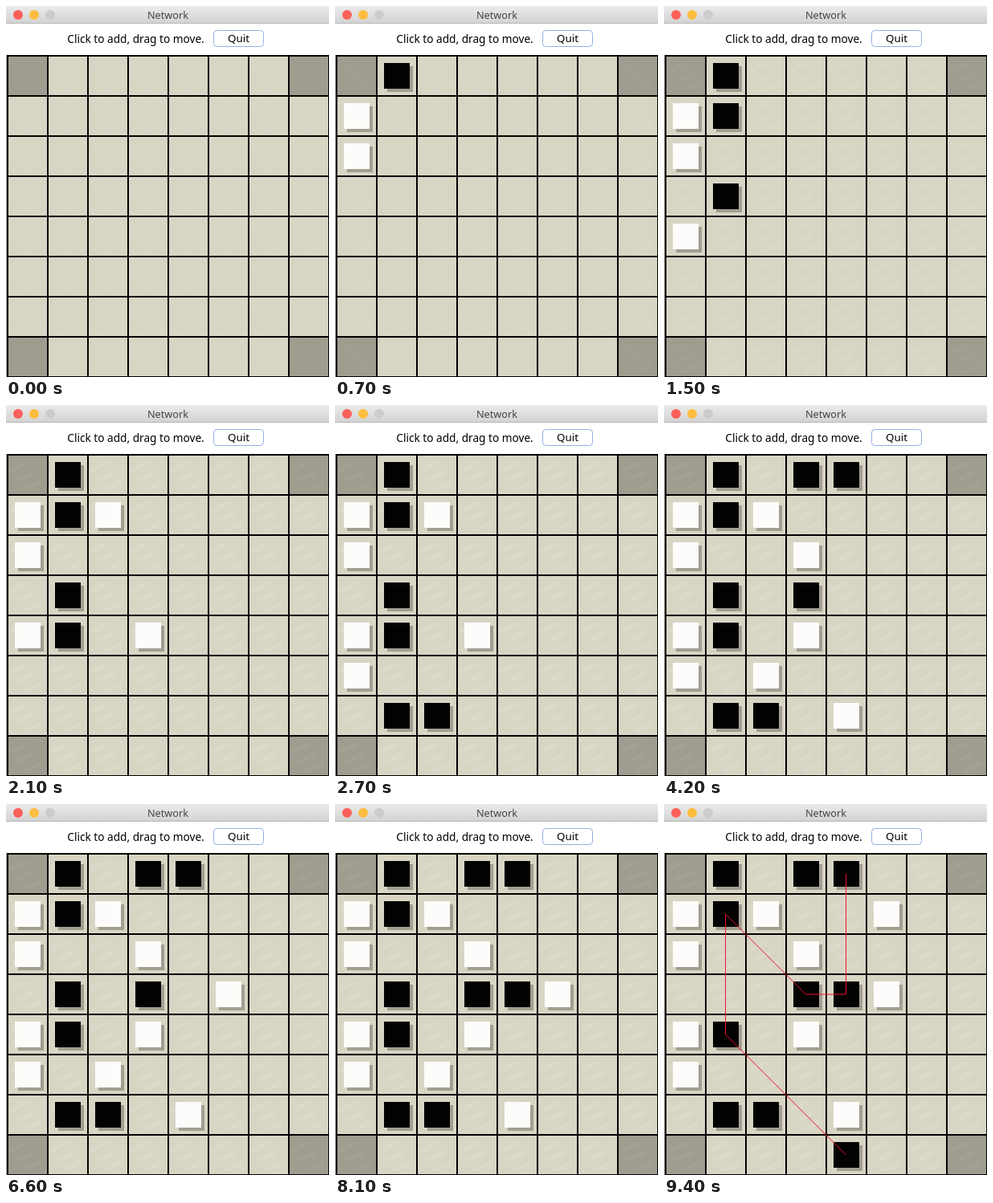
Recreate the animation shown at these times as an HTML page with a canvas. Size 402 px wide and 462 px high, loop 9500 ms.

```html
<!DOCTYPE html>
<html lang="en">
<head>
<meta charset="utf-8">
<title>Network</title>
<style>
html, body { margin: 0; width: 100%; height: 100%; overflow: hidden; background: #fff; }
canvas { display: block; }
</style>
</head>
<body>
<canvas id="stage" width="402" height="462"></canvas>
<script>
const g = document.getElementById('stage').getContext('2d');
const LOOP = 9500, STEP = 100, CELL = 50, LEFT = 2, TOP = 62, PIECE = 32;

// Cells are "column row"; white and black take turns, "a>b" moves a piece.
const moves = '01 10 02 11 04 13 21 14 34 16 05 26 32 30 25 40 46 33 53 43 25>51 13>47'.split(' ');
const winPath = '40 43 33 11 14 47'.split(' ');
const lateTimes = [4400, 7000, 8600, 9100];
const opening = moves.length - lateTimes.length;
const moveTime = i => i < opening ? 150 + 230 * i : lateTimes[i - opening];

const cellX = cell => LEFT + cell[0] * CELL;
const cellY = cell => TOP + cell[1] * CELL;

function rect(x, y, w, h, color) {
  g.fillStyle = color;
  g.fillRect(x, y, w, h);
}

function text(str, x, y, size, color) {
  g.font = `${size}px "Noto Sans", "Open Sans", sans-serif`;
  g.textAlign = 'center';
  g.fillStyle = color;
  g.fillText(str, x, y);
}

function titleBar() {
  const shade = g.createLinearGradient(0, 0, 0, 21);
  shade.addColorStop(0, '#ebebeb');
  shade.addColorStop(1, '#d3d3d3');
  rect(0, 0, 402, 21, shade);
  rect(0, 21, 402, 1, '#b6b6b6');
  ['#fc605b', '#fdbd40', '#cccccc'].forEach((color, i) => {
    g.beginPath();
    g.arc(15 + 20 * i, 11, 6, 0, 7);
    g.fillStyle = color;
    g.fill();
  });
  text('Network', 201.5, 16, 12.7, '#444');
}

function toolbar() {
  text('Click to add, drag to move.', 161.5, 46, 13.65, '#000');
  g.beginPath();
  g.roundRect(258.5, 30.5, 62, 20, 4);
  g.strokeStyle = '#8fb0e4';
  g.lineWidth = 1;
  g.stroke();
  text('Quit', 289.5, 45, 13.4, '#000');
}

function tile(col, row, grain) {
  const x = LEFT + col * CELL, y = TOP + row * CELL;
  const corner = col % 7 === 0 && row % 7 === 0;
  rect(x, y, CELL, CELL, corner ? '#a09d90' : '#d8d5c5');
  g.strokeStyle = `rgba(255,252,240,${(corner ? 0.04 : 0.1) * grain})`;
  g.lineWidth = 5;
  g.beginPath();
  for (let i = 0; i < 3; i++) {
    g.moveTo(x + 4 + 9 * i, y + 20 + 12 * i);
    g.lineTo(x + 24 + 9 * i, y + 10 + 12 * i);
  }
  g.stroke();
}

function board(t) {
  const grain = Math.min(1, 0.3 + t / 3500);
  rect(0, 61, 2, 401, '#b5aca6');
  for (let i = 0; i < 64; i++) tile(i % 8, i >> 3, grain);
  for (let i = 0; i <= 8; i++) {
    rect(LEFT - 1 + i * CELL, TOP - 1, 2, 401, '#000');
    rect(LEFT - 1, TOP - 1 + i * CELL, 401, 2, '#000');
  }
}

function pieces(t) {
  const placed = new Map();
  moves.forEach((move, i) => {
    if (t < moveTime(i)) return;
    const cells = move.split('>');
    if (cells.length > 1) placed.delete(cells[0]);
    placed.set(cells.at(-1), i % 2 ? '#020202' : '#fdfcfa');
  });
  for (const [cell, color] of placed) {
    const x = cellX(cell) + 9, y = cellY(cell) + 9;
    rect(x + 4, y + 4, PIECE, PIECE, '#a29e92');
    rect(x, y, PIECE, PIECE, color);
  }
}

function winLine() {
  g.beginPath();
  for (const cell of winPath) g.lineTo(cellX(cell) + 24.5, cellY(cell) + 25);
  g.strokeStyle = '#f5102f';
  g.lineWidth = 1;
  g.stroke();
}

function draw(now) {
  const t = Math.floor(now % LOOP / STEP) * STEP;
  rect(0, 0, 402, 462, '#fff');
  titleBar();
  toolbar();
  board(t);
  pieces(t);
  if (t >= moveTime(moves.length - 1)) winLine();
}

const start = performance.now();
function frame() {
  draw(performance.now() - start);
  requestAnimationFrame(frame);
}
frame();
</script>
</body>
</html>
```
